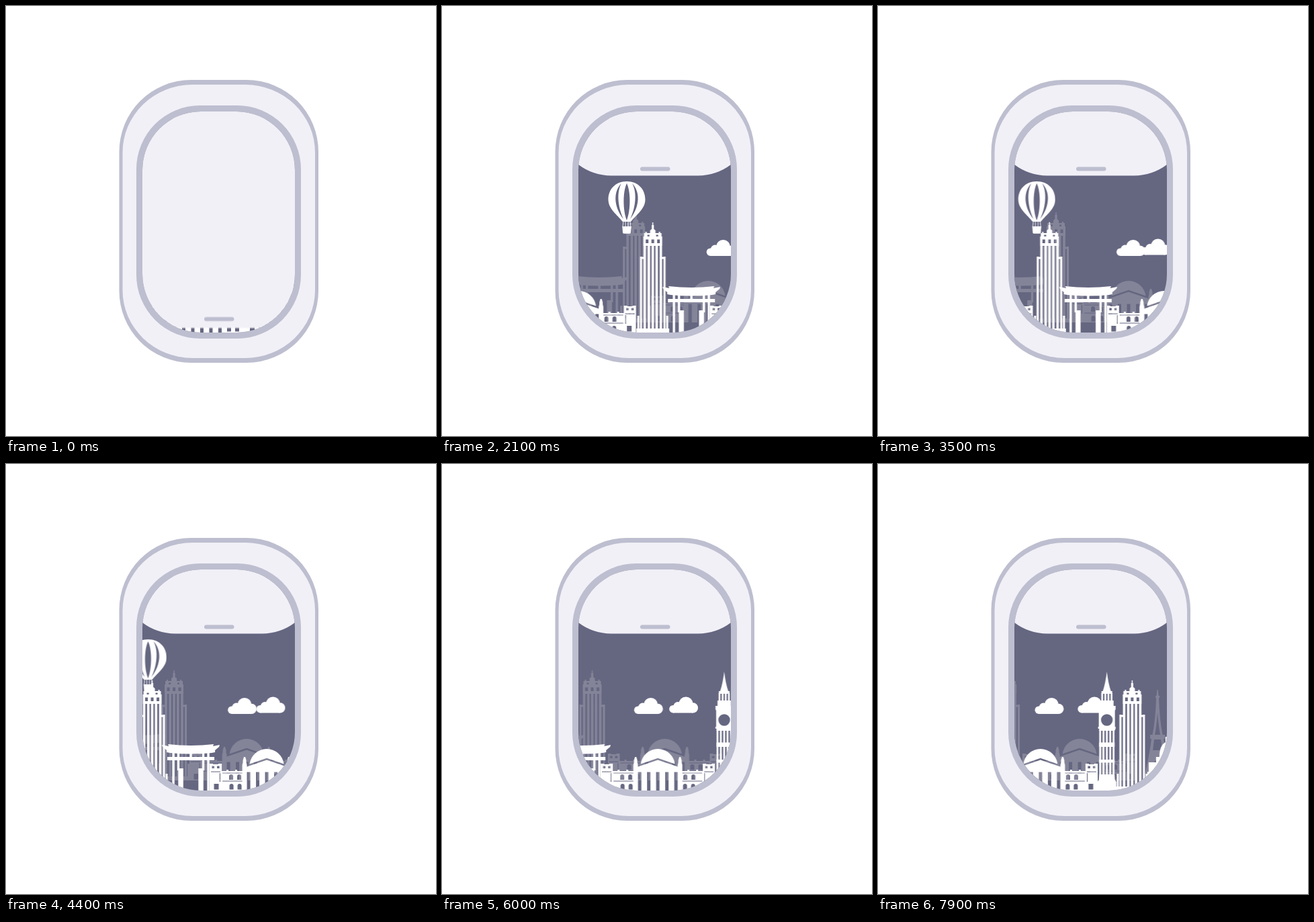
An HTML page without scripts that plays this animation: 640 px wide and 640 px high, repeating every 8 s.

```html
<!DOCTYPE html>
<html lang="en">
<head>
<meta charset="utf-8">
<title>City through a plane window</title>
<style>
  html, body { margin: 0; width: 100%; height: 100%; overflow: hidden; background: #fff; }
  svg { display: block; width: 100%; height: 100%; }

  .rim { fill: #bdbecf; }
  .panel { fill: #f1f0f7; }
  .sky { fill: #656680; }
  .near { fill: #fff; stroke: #fff; }
  .far { fill: #848499; stroke: #848499; }
  .solid { stroke: none; }
  .bars { fill: none; }

  /* ten poses per second */
  .drift { animation: drift 8s steps(80) -2ms infinite; }
  @keyframes drift { to { transform: translateX(var(--by)); } }

  /* the blind shoots up, overshoots and settles */
  .lift { animation: lift 8s step-end -2ms infinite; }
  @keyframes lift {
    0% { transform: translateY(var(--drop)); }
    1.25% { transform: translateY(calc(var(--drop) * .8)); }
    2.5% { transform: translateY(calc(var(--drop) * .6)); }
    3.75% { transform: translateY(calc(var(--drop) * .4)); }
    5% { transform: translateY(calc(var(--drop) * .2)); }
    6.25% { transform: translateY(0); }
    7.5% { transform: translateY(calc(var(--drop) * -.12)); }
    8.75% { transform: translateY(calc(var(--drop) * -.04)); }
    10% { transform: translateY(calc(var(--drop) * .022)); }
    11.25% { transform: translateY(calc(var(--drop) * .02)); }
    12.5% { transform: translateY(0); }
    13.75% { transform: translateY(calc(var(--drop) * -.004)); }
    15%, 100% { transform: translateY(0); }
  }
</style>
</head>
<body>
<svg viewBox="0 0 640 640">
  <defs>
    <clipPath id="pane"><rect x="203" y="157" width="227" height="329" rx="87"/></clipPath>

    <g id="cloud" class="solid">
      <circle cx="6" cy="18.2" r="5.8"/>
      <circle cx="13" cy="14" r="6.5"/>
      <circle cx="25" cy="10.5" r="10.5"/>
      <circle cx="35.5" cy="16.4" r="7.6"/>
      <path d="M6 14H35.5V24H6Z"/>
    </g>

    <g id="balloon">
      <path class="solid" fill-rule="evenodd" d="M0 261C17 261 27.5 273 27.5 288C27.5 302 14 311 6 321H-6C-14 311 -27.5 302 -27.5 288C-27.5 273 -17 261 0 261Z
        M0 264C6 276 6 304 0 319C-6 304 -6 276 0 264Z
        M-8 264C-20 276 -20 298 -5 317C-14 298 -15 276 -8 264Z
        M8 264C20 276 20 298 5 317C14 298 15 276 8 264Z"/>
      <path class="bars" stroke-width=".9" d="M-5 320L-6 329M-2 320V329M2 320V329M5 320L6 329"/>
      <path class="solid" d="M-6.7 328H6.7L6 337Q6 338.7 4.5 338.7H-4.5Q-6 338.7 -6 337Z"/>
    </g>

    <g id="tower">
      <path class="solid" fill-rule="evenodd" d="M-.7 322H.7V326H1.6V332L4 334V338H9V336H11V338H13V343H14V357H-14V343H-13V338H-11V336H-9V338H-4V334L-1.6 332V326H-.7Z
        M-10.5 347.500H-6.500V353H-10.500ZM-2 347.500H2V353H-2ZM6.500 347.500H10.500V353H6.500Z
        M-8 340.500H-5V343H-8ZM5 340.500H8V343H5Z"/>
      <path class="bars" stroke-width="3.6" d="M0 357V481M-5.800 357V481M5.800 357V481M-12 357V481M12 357V481"/>
      <path class="bars" stroke-width="3" d="M-17.500 373V481M17.500 373V481M-21.500 461V481M21.500 461V481M-19 375H-12M19 375H12"/>
      <path class="solid" d="M-24.500 480H24.500V486H-24.500Z"/>
    </g>

    <g id="gate">
      <path class="solid" d="M-43 418L-33 420L-34 417Q0 421 34 417L33 420L43 418L42 421L36 426V429L31 430Q0 433 -31 430L-36 429V426L-42 421Z"/>
      <path class="solid" d="M-35 436H35V441H-35Z"/>
      <path class="bars" stroke-width="3.4" d="M-26 429V486M26 429V486M-18.500 429V456M18.500 429V456M0 430V437"/>
      <path class="bars" stroke-width="7.500" d="M-15 453V486M15 453V486"/>
    </g>

    <g id="wing" class="solid">
      <path d="M29.500 458V448L30.500 444V441L32 436H34L35.500 441V444L36.500 448V486H29.500Z"/>
      <path fill-rule="evenodd" d="M36 457H44V455H47V457H57V455H60V457H68V486H36Z
        M36 459.500H66V460.500H36Z
        M38 470V465A3 3 0 0 1 44 465V470ZM50 470V465A3 3 0 0 1 56 465V470Z
        M37.500 484.500V479A3 3 0 0 1 43.500 479V484.500ZM49.500 484.500V479A3 3 0 0 1 55.500 479V484.500Z
        M36 471.500H66V472.500H36Z"/>
      <path fill-rule="evenodd" d="M67 446H72V447H80V446H85V486H67Z
        M70.500 449.500H74V453H70.500ZM78 449.500H81.500V453H78Z
        M69 457.500H83V458.700H69ZM69 460H70.200V473H69Z
        M71.500 476H78.500V484.500H71.500Z"/>
    </g>

    <g id="hall">
      <path class="solid" d="M-25.500 446.500A25.700 25.700 0 0 1 25.500 446.500L0 437.700Z"/>
      <path class="solid" d="M-36 453L-28 450L0 440.500L28 450L36 453V458.500H-36Z"/>
      <path class="bars" stroke-width="8.500" d="M-20.250 458V486M-6.750 458V486M6.750 458V486M20.250 458V486"/>
      <use href="#wing"/>
      <use href="#wing" transform="scale(-1 1)"/>
    </g>

    <g id="clock">
      <path class="solid" d="M0 309Q2 326 6 338H8V342H-8V338H-6Q-2 326 0 309Z"/>
      <path class="bars" stroke-width="2.600" d="M-7 341V353M-2.300 341V353M2.300 341V353M7 341V353"/>
      <path class="solid" fill-rule="evenodd" d="M-10 352H10V360H13V365L12 367V391H13V394L11.500 397H-11.500V394H-13V391H-12V367L-13 365V360H-10Z
        M-8.700 381A8.700 8.700 0 0 0 8.700 381A8.700 8.700 0 0 0 -8.700 381Z"/>
      <path class="bars" stroke-width="2.700" d="M-10 396V463M-5 396V463M0 396V463M5 396V463M10 396V463"/>
      <path class="solid" d="M-11.500 414.500H11.500V421H-11.500ZM-11.500 440H11.500V444.500H-11.500ZM-11.500 462H11.500L12 470L14 473V486H-14V473L-12 470Z"/>
    </g>

    <g id="spire">
      <path class="solid" fill-rule="evenodd" d="M-.6 351H.6L1.600 360H3V363H2Q3 395 7.500 418H11V424H9Q13 454 21 486H11Q8 455 0 455Q-8 455 -11 486H-21Q-13 454 -9 424H-11V418H-7.500Q-3 395 -2 363H-3V360H-1.600Z
        M0 385Q1.500 405 4 418H-4Q-1.500 405 0 385ZM-5 425H5L7 441H-7Z"/>
    </g>
  </defs>

  <rect class="rim" x="168.500" y="110" width="296.500" height="421" rx="107"/>
  <rect class="panel" x="173.500" y="117" width="286.500" height="407" rx="104" ry="101"/>
  <rect class="rim" x="194" y="148" width="245" height="347" rx="95"/>

  <g clip-path="url(#pane)">
    <rect class="sky" x="200" y="150" width="234" height="340"/>

    <g class="drift far" style="--by:-132.600px">
      <g transform="translate(0 -15)">
        <use href="#gate" x="269"/>
        <use href="#tower" x="323"/>
        <use href="#hall" x="431"/>
        <use href="#spire" x="547"/>
      </g>
    </g>

    <g class="drift near" style="--by:-221px">
      <use href="#cloud" x="196" y="276"/>
      <use href="#cloud" x="451.500" y="348"/>
      <use href="#balloon" x="333"/>
    </g>

    <g class="drift near" style="--by:-172px">
      <use href="#cloud" x="467" y="346.500"/>
    </g>

    <g class="drift near" style="--by:-334.400px">
      <use href="#hall" x="291.500"/>
      <use href="#tower" x="401.500"/>
      <use href="#gate" x="459"/>
      <use href="#hall" x="572"/>
      <use href="#clock" x="670.800"/>
      <use href="#tower" x="708.500"/>
      <path class="solid" d="M731 486V458H733V444H744V436H749Q749 419 758 414V406H775V486Z"/>
    </g>

    <path class="lift panel" style="--drop:226.500px" d="M203 -100V236Q224 252 252 252.500H381Q409 252 430 236V-100Z"/>
    <rect class="lift rim" style="--drop:223.500px" x="295" y="239.500" width="44.500" height="6" rx="3"/>
  </g>
</svg>
</body>
</html>
```
